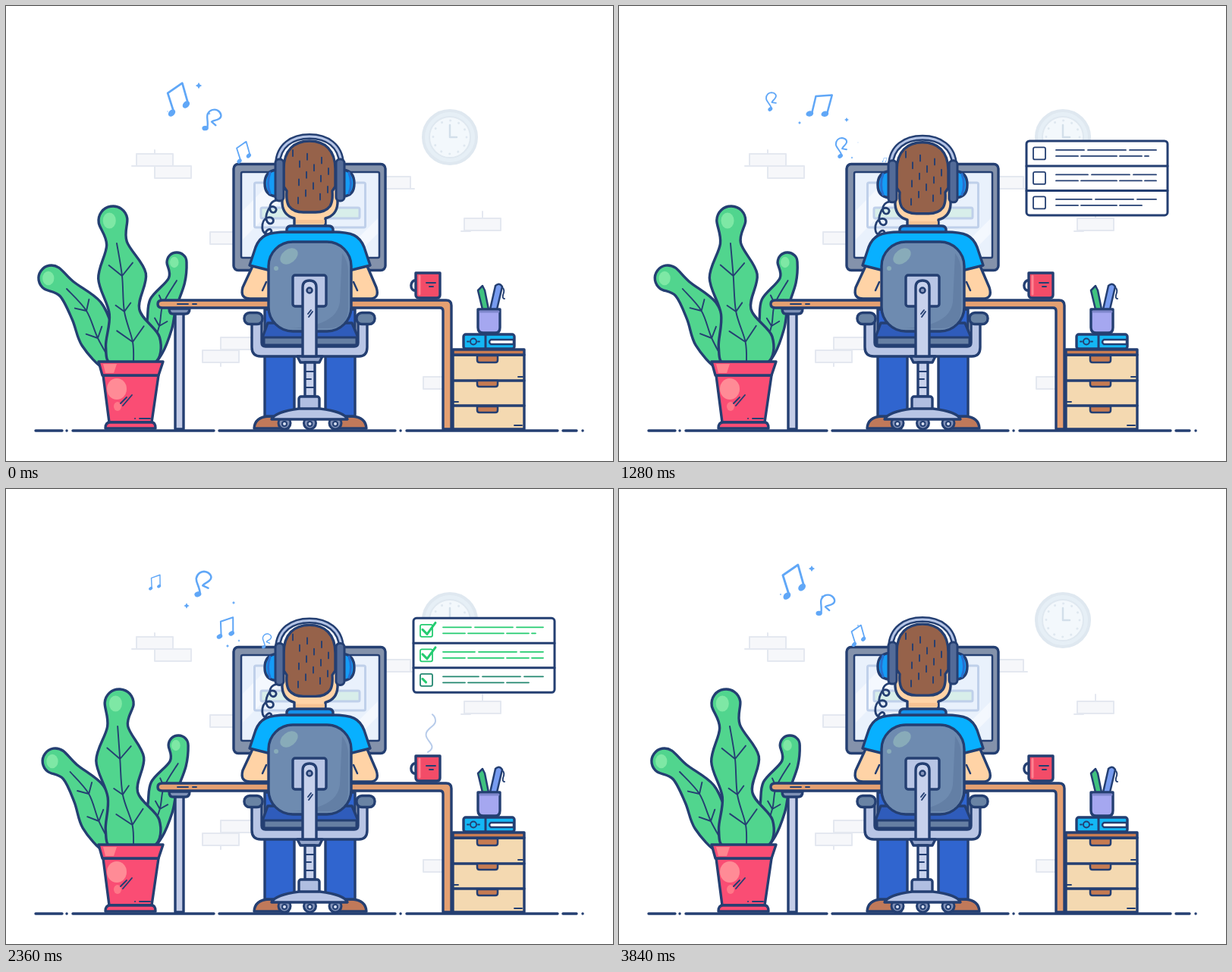
An HTML page for the animation above (3.88 s loop, 800 by 600 pixels).

```html
<!DOCTYPE html>
<html lang="en">
<head>
<meta charset="utf-8">
<title>Working to music</title>
<style>
html, body { margin: 0; width: 100%; height: 100%; overflow: hidden; background: #fff; }
svg { display: block; width: 800px; height: 600px; }
.ink { stroke: #243f72; }
.thin { stroke: #243f72; stroke-width: 1.9; fill: none; }
.pale { stroke: #e4e8f0; stroke-width: 2; fill: #f6f7fa; }
</style>
</head>
<body>
<svg viewBox="0 0 800 600" fill="none" stroke-width="3.4" stroke-linecap="round" stroke-linejoin="round">
  <path id="bricks" class="pale"/>
  <g stroke="#dfe8f0">
    <circle cx="585" cy="173" r="35" fill="#e6eff6" stroke-width="4"/>
    <circle cx="585" cy="173" r="27" fill="#f3f8fc" stroke-width="2"/>
    <circle cx="585" cy="173" r="22" stroke-width="3" stroke-dasharray="0.1 11.42"/>
    <path d="M585 157V173H594" stroke="#d3dfea" stroke-width="2.5"/>
  </g>
  <path class="ink" d="M39 560H74M80 560h.1M88 560H274M281 560H513M520 560h.1M528 560H727M734 560H752M760 560h.1"/>

  <!-- monitor -->
  <rect class="ink" x="300" y="208.5" width="200" height="140" rx="6" fill="#8492ab"/>
  <rect class="ink" x="310" y="219" width="182" height="113" rx="2" fill="#e9f1fc" stroke-width="2.5"/>
  <path d="M312 316V270L360 221H398L312 308M440 330L490 280V300L460 330z" fill="#f4f8fe"/>
  <rect x="327.5" y="233" width="146" height="59" rx="2" stroke="#bfd0ea" stroke-width="3"/>
  <rect x="336" y="266" width="130" height="14" rx="2" fill="#d8eeea" stroke="#bfd0ea" stroke-width="3"/>

  <!-- head -->
  <g id="head" class="ink">
    <path d="M357 256C344 258 346 275 354 272C361 267 349 259 345 270C339 283 347 291 352 285C355 277 340 275 338 288C336 302 348 304 350 297C349 291 340 296 342 304" stroke-width="2.8"/>
    <path d="M364 236V260Q365 276 380 280V294H421V280Q436 276 437 260V236z" fill="#ffd3a6"/>
    <path d="M382 282H420V287H382z" fill="#f8c394" stroke="none"/>
    <path d="M366 238V215C366 190 380 178 400 178S434 190 434 215V238L430 244Q431 258 427 264Q421 272 408 272H392Q379 272 373 264Q369 258 370 244z" fill="#96624a"/>
    <path id="hair" class="thin"/>
    <path d="M358 208C359 184 377 172 400 172S441 184 442 208" stroke-width="8"/>
    <path d="M358 208C359 184 377 172 400 172S441 184 442 208" stroke="#b4c4e6" stroke-width="3"/>
    <path d="M356 216Q341 218 341 234T356 251zM445 216Q459 218 459 234T445 251z" fill="#159cf6"/>
    <path d="M348 220Q343 234 348 247M452 220Q457 234 452 247" stroke="#2870cf" stroke-width="3"/>
    <rect x="355" y="202" width="11" height="55" rx="5" fill="#536b98" stroke-width="3"/>
    <rect x="435" y="202" width="11" height="55" rx="5" fill="#536b98" stroke-width="3"/>
  </g>

  <!-- arms and shirt -->
  <g class="ink">
    <path d="M325 343L312 371Q308 386 322 386H352V340zM476 343L488 371Q493 386 479 386H449V340z" fill="#ffd3a6"/>
    <path d="M343 364L338 375M458 364L463 375" stroke-width="2.5"/>
    <path d="M371 298C344 298 335 303 329 318L321 342L349 349H452L480 342L472 318C466 303 457 298 430 298z" fill="#08b0ff"/>
    <path d="M370 298V294Q371 290 376 290H425Q430 290 431 294V298z" fill="#1590ea"/>
  </g>

  <!-- legs -->
  <g class="ink">
    <path d="M327 557Q328 542 346 541H372V557zM475 557Q474 542 456 541H430V557z" fill="#c0795a"/>
    <path d="M341 400H380V541H341zM421 400H460V541H421z" fill="#3065cf"/>
  </g>

  <g id="plant"></g>
  <g class="ink">
    <path d="M128 487H201L192 549H136z" fill="#fa4d74"/>
    <path d="M122 469H207L201 487H127z" fill="#fa4d74"/>
    <path d="M128 472H146L142 484H131z" fill="#ff858f" stroke="none"/>
    <path d="M137 549H192Q197 549 197 557H131Q131 549 137 549z" fill="#fa4d74"/>
    <ellipse cx="146" cy="505" rx="13" ry="14" fill="#ff8b96" stroke="none"/>
    <ellipse cx="147" cy="528" rx="5" ry="6" fill="#ff7788" stroke="none"/>
    <path class="thin" d="M151 524L159 516M154 527L166 513M176 544H190M170 544h.1"/>
  </g>

  <!-- desk -->
  <g class="ink">
    <path d="M223 400H234V558H223z" fill="#c4cde8"/>
    <path d="M215 399H242Q242 406 236 406H220Q215 406 215 399z" fill="#7f92b7"/>
    <path d="M206 388H580Q587 388 587 395V558H576V402Q576 398 572 398H206Q200 398 200 393T206 388z" fill="#e5a072"/>
    <path class="thin" d="M226 393H240M246 393H251"/>
  </g>

  <!-- chair -->
  <g class="ink">
    <path d="M345 418L338 437V447H464V437L456 418z" fill="#2f5cbb"/>
    <path d="M340 437H462V447H340z" fill="#667fa3" stroke-width="3"/>
    <path d="M324 415V450Q324 462 336 462H465Q476 462 476 450V415H464V444Q464 449 459 449H342Q337 449 337 444V415z" fill="#b8c5e5"/>
    <rect x="314" y="404.5" width="24" height="15" rx="7" fill="#6983a4"/>
    <rect x="462" y="404.5" width="24" height="15" rx="7" fill="#6983a4"/>
    <rect x="346" y="311" width="109" height="118" rx="32" fill="#6e8bb0"/>
    <path d="M443 326Q451 336 451 350V398Q451 425 425 425H372Q436 423 440 390z" fill="#637fa5" stroke="none"/>
    <ellipse cx="373" cy="330" rx="13" ry="9" transform="rotate(-38 373 330)" fill="#88abb9" stroke="none"/>
    <circle cx="356" cy="346" r="3" fill="#88abb9" stroke="none"/>
    <rect x="378" y="355" width="44" height="41" rx="3" fill="#b8c5e5"/>
    <path d="M384 462H417L413 470H388z" fill="#93a5cb"/>
    <path d="M394 470H407V515H394z" fill="#c7d1ec"/>
    <path class="thin" d="M394 482H407M394 492H402M394 503H407"/>
    <path d="M391 371Q391 362 400 362T409 371V462H391z" fill="#c7d1ec"/>
    <circle cx="400" cy="375" r="3.5" fill="#8797bd" stroke-width="2.5"/>
    <path class="thin" d="M398 406L402 401M399 410L404 403"/>
    <rect x="386" y="515" width="27" height="17" rx="3" fill="#b0bee1"/>
    <g id="wheels" fill="#8292b8" stroke-width="3"></g>
    <path d="M350 545Q355 535 386 531H414Q446 535 450 545z" fill="#b8c5e5"/>
  </g>

  <!-- mug, stationery, drawers -->
  <g class="ink">
    <path d="M541 362C532 360 531 377 541 375"/>
    <path d="M540 352H572V381Q572 385 568 385H545Q540 385 540 381z" fill="#f34c68"/>
    <path d="M545 356V380" stroke="#ff8290" stroke-width="3"/>
    <path class="thin" d="M554 365H566M558 370H563"/>
    <path d="M622 375L628 369L631 375L636 400H628z" fill="#40c27f" stroke-width="2.5"/>
    <path d="M645 369Q650 364 654 370L647 400H638z" fill="#779cf0" stroke-width="2.5"/>
    <path class="thin" d="M654 371Q658 374 655 381Q654 386 657 386"/>
    <path d="M622 400H651V424Q651 431 645 431H629Q622 431 622 424z" fill="#a5a7f0"/>
    <path d="M625 403H649" stroke="#7f87cc" stroke-width="3"/>
    <rect x="603" y="433" width="67" height="19" rx="3" fill="#14b7f5"/>
    <path d="M632 433V452" stroke-width="3"/>
    <path d="M669 440H639Q635 443 639 446H669z" fill="#fff" stroke-width="2.5"/>
    <circle class="thin" cx="616" cy="442.5" r="4"/>
    <path class="thin" d="M608 442.5h2M622 442.5h2"/>
    <path d="M589 460H683V558H589z" fill="#f4d9b1"/>
    <path d="M589 453H683V460H589z" fill="#ca7d52"/>
    <path d="M589 494H683M589 527H683"/>
    <path class="thin" d="M675 489H681M590 522H596M670 553H680"/>
    <path d="M621 461H648V467Q648 470 645 470H624Q621 470 621 467zM621 494H648V499Q648 502 645 502H624Q621 502 621 499zM621 528H648V533Q648 536 645 536H624Q621 536 621 533z" fill="#c67b52" stroke-width="2.5"/>
  </g>

  <path id="steam" d="M556 347C573 337 544 330 557 317C562 312 566 311 566 306C566 292 545 291 545 306C546 314 556 315 559 309" stroke="#b7cbea" stroke-width="2" pathLength="100"/>
  <g id="sparks" fill="#60a7f7"></g>
  <g id="notes" stroke="#60a7f7" stroke-width="2.8"></g>
  <g id="panel"></g>
</svg>
<script>
const LOOP = 3880, TAU = Math.PI * 2;
const $ = id => document.getElementById(id);
const ramp = (t, from, to) => Math.max(0, Math.min(1, (t - from) / (to - from)));
const mod = (a, n) => ((a % n) + n) % n;
const repeat = (n, make) => Array.from({ length: n }, (_, i) => make(i)).join('');

// Smooth path through points.
function spline(pts, closed) {
  const n = pts.length;
  const at = i => closed ? pts[mod(i, n)] : pts[Math.max(0, Math.min(n - 1, i))];
  let d = 'M' + pts[0];
  for (let i = 0; i < (closed ? n : n - 1); i++) {
    const [p, a, b, q] = [at(i - 1), at(i), at(i + 1), at(i + 2)];
    d += `C${a.map((v, k) => v + (b[k] - p[k]) / 6)} ${b.map((v, k) => v - (q[k] - a[k]) / 6)} ${b}`;
  }
  return d;
}

const brick = corner => `M${corner}h48v16h-48z`;
$('bricks').setAttribute('d',
  ['172 195', '196 211', '269 298', '283 437', '259 454', '485 225', '604 280', '550 489'].map(brick).join('') +
  'M166 211H196M196 190V195M283 470V475M532 241H538M600 297H612M628 271V280');
$('hair').setAttribute('d', repeat(14, i => `M${378 + i * 19 % 48} ${190 + i * 4.8}v8`));
$('wheels').innerHTML = repeat(3, i =>
  `<circle cx="${367 + 33.5 * i}" cy="550" r="8"/><circle cx="${367 + 33.5 * i}" cy="551" r="3" fill="#d8e0f3" stroke-width="2"/>`);

// Each leaf is a spine of x, y, half width from tip to root.
const leaves = [
  {
    spine: [[225, 338, 13], [225, 362, 11], [207, 393, 18], [202, 422, 17], [191, 452, 16], [180, 472, 10]],
    height: 130, sway: t => -3.4 * Math.sin(TAU * t / LOOP), bend: v => v
  },
  {
    spine: [[60, 359, 17], [80, 373, 13], [106, 402, 22], [121, 438, 23], [140, 472, 12]],
    height: 110, sway: t => 3 * (1 - Math.cos(TAU * t / LOOP)), bend: v => v
  },
  {
    spine: [[141, 283, 19], [146, 313, 13.5], [153, 356, 31.5], [156, 403, 20], [167, 443, 36], [168, 472, 27]],
    height: 183, sway: t => 4.4 * (1 - Math.cos(TAU * t / LOOP)), bend: v => v * v * (5 * v - 4)
  }
];

// Returns a function per spine row that places points along and across the leaf.
const frames = spine => spine.map(([x, y, w], i) => {
  const a = spine[Math.max(i - 1, 0)], b = spine[Math.min(i + 1, spine.length - 1)];
  const length = Math.hypot(b[0] - a[0], b[1] - a[1]);
  const tx = (b[0] - a[0]) / length * w, ty = (b[1] - a[1]) / length * w;
  return (along, across) => [x + tx * along - ty * across, y + ty * along + tx * across];
});

function drawLeaf({ spine, height, sway, bend }, t) {
  const bent = spine.map(([x, y, w]) => [x + sway(t) * bend(Math.max(0, 467 - y) / height), y, w]);
  const rows = frames(bent), [tip] = rows, [x, y, w] = bent[0];
  const edge = [tip(-.72, -.7), tip(-1, 0), tip(-.72, .7), ...rows.map(p => p(0, 1)), ...rows.map(p => p(0, -1)).reverse()];
  const vein = (p, side) => `M${p(0, 0)}L${p(-.5, side * .5)}`;
  return `<path class="ink" fill="#51d58e" d="${spline(edge, true)}"/>
    <ellipse cx="${x - w * .25}" cy="${y}" rx="${w * .45}" ry="${w * .55}" fill="#7ee8a5"/>
    <path class="thin" d="${spline(rows.slice(1).map(p => p(0, 0)))}${rows.slice(2, -1).map(p => vein(p, 1) + vein(p, -1)).join('')}"/>`;
}

const beamed = '<path d="M-9 14L-8-12L15-18L13 10M-4-13"/>' +
  '<g fill="#60a7f7" stroke="none"><ellipse cx="-12" cy="15" rx="5.5" ry="4" transform="rotate(-25 -12 15)"/>' +
  '<ellipse cx="10" cy="11" rx="5.5" ry="4" transform="rotate(-25 10 11)"/></g>';
const single = '<path d="M-4 14C-5 4-12-2-11-8C-10-15-4-19 2-18C10-16 12-10 8-6C5-2 0-1-1 2L7 5"/>' +
  '<ellipse cx="-7" cy="15" rx="5" ry="3.8" transform="rotate(-25 -7 15)" fill="#60a7f7" stroke="none"/>';
$('notes').innerHTML = repeat(4, i => `<g>${i % 2 ? single : beamed}</g>`);

// A note drifts up and left in a quickening wave, grows, then shrinks away.
function notePose(age) {
  const wave = Math.sin(Math.PI * (age / 1650) ** 1.5);
  const x = 352 - .048 * age - 9 * wave;
  const y = 204 - .031 * age + 14 * wave;
  const turn = -20 * Math.cos(TAU * (age - 700) / 1950);
  const size = (.5 + .0002 * age) * ramp(age, 0, 120) * ramp(age, 3450, 2600);
  return `translate(${x} ${y}) rotate(${turn}) scale(${size})`;
}

// x, y, radius; neighbours twinkle in turn.
const sparks = [[254, 105, 4.2], [238, 154, 4], [213, 139, 2], [300, 150, 3],
  [292, 207, 3.6], [315, 180, 1.8], [307, 200, 1.8], [268, 142, 2]];
$('sparks').innerHTML = repeat(sparks.length, () => '<path d="M0-1L.35-.35L1 0L.35 .35L0 1L-.35 .35L-1 0L-.35-.35z"/>');

function sparkPose(i, t) {
  const [x, y, r] = sparks[i];
  const peak = i / 2 + .8 * (i >> 1);
  const size = r * Math.max(0, .2 + .8 * Math.cos(TAU * (t * 4 / LOOP - peak)));
  return `translate(${x} ${y}) scale(${size})`;
}

$('panel').innerHTML = `<g class="ink" stroke-width="3"><rect x="537" y="0" width="186" height="98" rx="4" fill="#fff"/>
  <path d="M537 33H723M537 65.5H723"/></g>` +
  repeat(3, i => `<g class="row" transform="translate(0 ${i * 32.5})" stroke-width="1.8">
    <rect x="546" y="8.5" width="16" height="16" rx="2"/>
    <path d="M576 12H708" stroke-dasharray="${37 + 5 * i} 5 50 5"/>
    <path d="M576 20H${[698, 708, 690][i]}" stroke-dasharray="29 4 47 4"/>
    <path class="tick" d="M549 15L555 21L566 6" stroke="#24cc70" stroke-width="3" pathLength="1"/></g>`);
const tasks = [...document.querySelectorAll('.row')];

function drawPanel(t) {
  const enter = 1 - ramp(t, 240, 1060);
  const leave = ramp(t, 3300, 3600);
  const y = 174.5 + 4.8 * Math.cos(TAU * (t - 1530) / 2000) + 38 * enter ** 2 - 6 * leave;
  $('panel').setAttribute('transform', `translate(0 ${y})`);
  $('panel').setAttribute('opacity', ramp(t, 340, 640) * (1 - leave));
  tasks.forEach((row, i) => {
    const done = ramp(t, 1300 + 500 * i, 1560 + 500 * i);
    const green = Math.min(1, done * 2.2);
    row.setAttribute('stroke', `rgb(${36} ${63 + 141 * green} ${114 - 2 * green})`);
    const tick = row.querySelector('.tick');
    tick.setAttribute('stroke-dasharray', `${done} 2`);
    tick.setAttribute('visibility', done > 0 ? 'visible' : 'hidden');
  });
}

function drawSteam(t) {
  const head = 100 * ramp(t, 1600, 2900), tail = 100 * ramp(t, 2360, 3200);
  $('steam').setAttribute('stroke-dasharray', `0 ${tail} ${Math.max(0, head - tail)} 200`);
  $('steam').setAttribute('visibility', head > tail ? 'visible' : 'hidden');
}

function draw(t) {
  $('head').setAttribute('transform', `translate(0 ${1.3 * (1 - Math.cos(TAU * 7 * t / LOOP))})`);
  $('plant').innerHTML = leaves.map(leaf => drawLeaf(leaf, t)).join('');
  [...$('notes').children].forEach((note, i) =>
    note.setAttribute('transform', notePose(mod(t + 700 - i * LOOP / 4, LOOP))));
  [...$('sparks').children].forEach((spark, i) => spark.setAttribute('transform', sparkPose(i, t)));
  drawSteam(t);
  drawPanel(t);
}

const start = performance.now();
function frame() {
  draw((performance.now() - start) % LOOP);
  requestAnimationFrame(frame);
}
frame();
</script>
</body>
</html>
```
